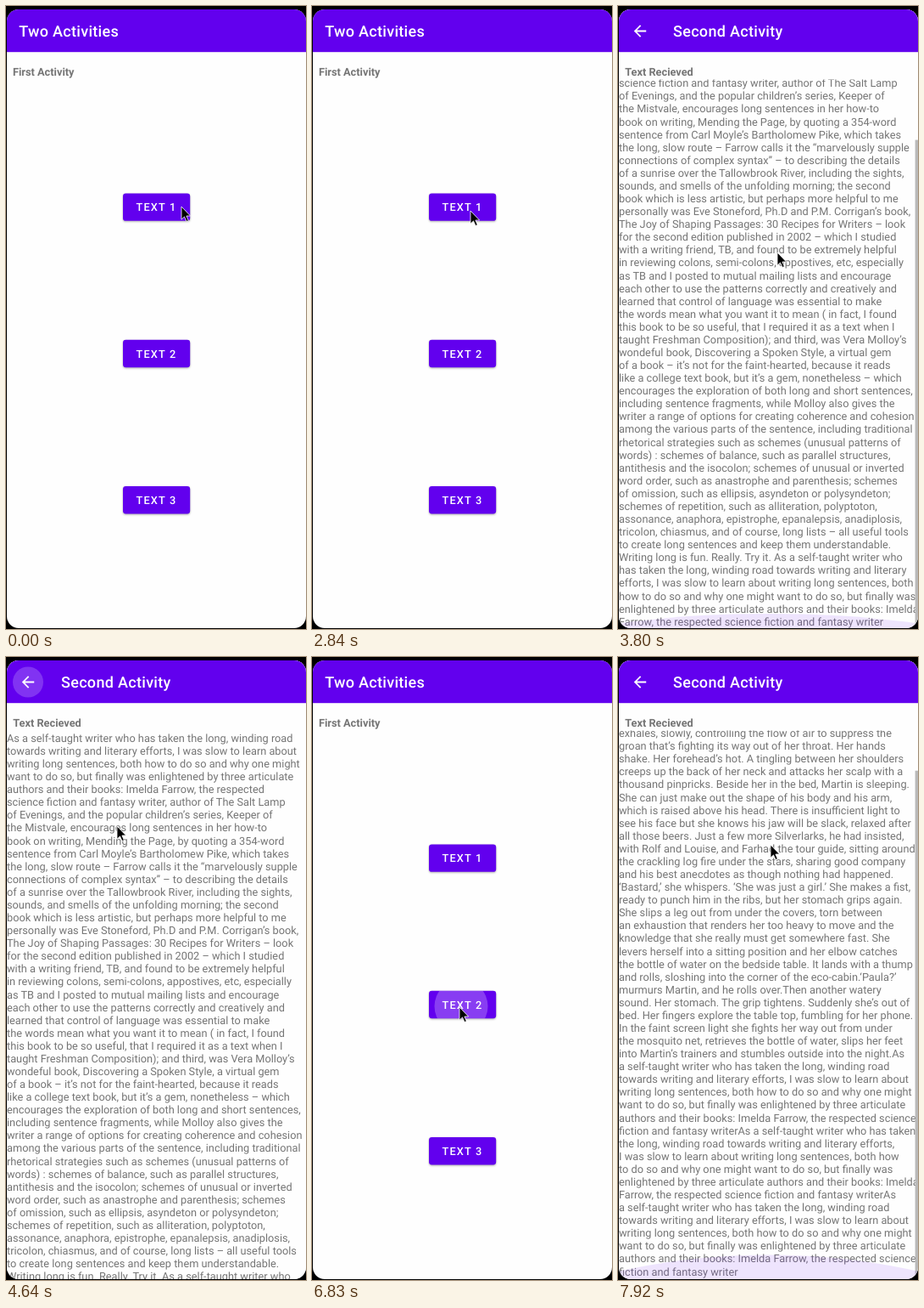
An HTML page that plays this animation: 354 by 733 pixels, repeating every 8000 ms.

```html
<!DOCTYPE html>
<html lang="en">
<head>
<meta charset="utf-8">
<title>Two Activities</title>
<style>
html, body { margin: 0; width: 100%; height: 100%; overflow: hidden; background: #000; }
svg { display: block; }
text { font: 12.785px Roboto, sans-serif; fill: #757575; text-rendering: geometricPrecision; white-space: pre; }
text.title { font-size: 18.03px; font-weight: 500; fill: #fff; letter-spacing: .016em; }
text.label { font-weight: 700; }
text.caption { font-weight: 500; fill: #fff; letter-spacing: .0893em; }
.page { fill: #fefefe; }
.purple { fill: #6200ee; }
.button { filter: drop-shadow(0 1.2px 1.1px rgba(0, 0, 0, .32)); }
</style>
</head>
<body>
<svg width="354" height="733" viewBox="0 0 354 733">
  <defs>
    <clipPath id="screen"><rect x="1" y="4" width="353" height="728" rx="14"/></clipPath>
    <clipPath id="view"><rect x="0" y="86.4" width="354" height="645.6"/></clipPath>
    <clipPath id="buttonClip"></clipPath>
  </defs>
  <g clip-path="url(#screen)">
    <g id="first">
      <rect class="page" x="1" y="4" width="353" height="728"/>
      <rect class="purple" x="1" y="4" width="353" height="50.2"/>
      <text class="title" x="15.2" y="36.3">Two Activities</text>
      <text class="label" x="7.9" y="82.3">First Activity</text>
      <g id="buttons"></g>
      <g clip-path="url(#buttonClip)"><circle id="ripple" fill="#fff"/></g>
      <g id="captions"></g>
    </g>
    <g id="second">
      <rect class="page" x="1" y="4" width="353" height="728"/>
      <rect class="purple" x="1" y="4" width="353" height="50.2"/>
      <circle id="backRipple" cx="26" cy="29.5" r="18" fill="#fff"/>
      <path fill="#fff" transform="translate(15.2 18.7) scale(.9014)"
        d="M20 11H7.83l5.59-5.59L12 4l-8 8 8 8 1.41-1.41L7.83 13H20z"/>
      <text class="title" x="65" y="36.3">Second Activity</text>
      <text class="label" x="8.2" y="82.3">Text Recieved</text>
      <g clip-path="url(#view)">
        <g id="story0"></g>
        <g id="story1"></g>
        <rect id="thumb" x="350.6" width="3.4" fill="#b9b9b9"/>
        <ellipse id="glow" class="purple" cx="177.5" rx="425" fill-opacity=".1"/>
      </g>
    </g>
  </g>
  <path id="cursor" d="M0 0V15.2L3.5 11.9 6 17.5 8.3 16.5 5.9 11H10.6Z" stroke="#fff" stroke-width=".8"/>
</svg>
<script>
const stories = [`As a self-taught writer who has taken the long, winding road
towards writing and literary efforts, I was slow to learn about
writing long sentences, both how to do so and why one might
want to do so, but finally was enlightened by three articulate
authors and their books: Imelda Farrow, the respected
science fiction and fantasy writer, author of The Salt Lamp
of Evenings, and the popular children’s series, Keeper of
the Mistvale, encourages long sentences in her how-to
book on writing, Mending the Page, by quoting a 354-word
sentence from Carl Moyle’s Bartholomew Pike, which takes
the long, slow route – Farrow calls it the “marvelously supple
connections of complex syntax” – to describing the details
of a sunrise over the Tallowbrook River, including the sights,
sounds, and smells of the unfolding morning; the second
book which is less artistic, but perhaps more helpful to me
personally was Eve Stoneford, Ph.D and P.M. Corrigan’s book,
The Joy of Shaping Passages: 30 Recipes for Writers – look
for the second edition published in 2002 – which I studied
with a writing friend, TB, and found to be extremely helpful
in reviewing colons, semi-colons, appostives, etc, especially
as TB and I posted to mutual mailing lists and encourage
each other to use the patterns correctly and creatively and
learned that control of language was essential to make
the words mean what you want it to mean ( in fact, I found
this book to be so useful, that I required it as a text when I
taught Freshman Composition); and third, was Vera Molloy’s
wondeful book, Discovering a Spoken Style, a virtual gem
of a book – it’s not for the faint-hearted, because it reads
like a college text book, but it’s a gem, nonetheless – which
encourages the exploration of both long and short sentences,
including sentence fragments, while Molloy also gives the
writer a range of options for creating coherence and cohesion
among the various parts of the sentence, including traditional
rhetorical strategies such as schemes (unusual patterns of
words) : schemes of balance, such as parallel structures,
antithesis and the isocolon; schemes of unusual or inverted
word order, such as anastrophe and parenthesis; schemes
of omission, such as ellipsis, asyndeton or polysyndeton;
schemes of repetition, such as alliteration, polyptoton,
assonance, anaphora, epistrophe, epanalepsis, anadiplosis,
tricolon, chiasmus, and of course, long lists – all useful tools
to create long sentences and keep them understandable.
Writing long is fun. Really. Try it. As a self-taught writer who
has taken the long, winding road towards writing and literary
efforts, I was slow to learn about writing long sentences, both
how to do so and why one might want to do so, but finally was
enlightened by three articulate authors and their books: Imelda
Farrow, the respected science fiction and fantasy writer`,
`Sweat lies cold on Paula’s skin. She shivers. Her stomach
tightens and she tucks up her knees as pain slices through
her gut. She grits her teeth and holds her breath. Then she
exhales, slowly, controlling the flow of air to suppress the
groan that’s fighting its way out of her throat. Her hands
shake. Her forehead’s hot. A tingling between her shoulders
creeps up the back of her neck and attacks her scalp with a
thousand pinpricks. Beside her in the bed, Martin is sleeping.
She can just make out the shape of his body and his arm,
which is raised above his head. There is insufficient light to
see his face but she knows his jaw will be slack, relaxed after
all those beers. Just a few more Silverlarks, he had insisted,
with Rolf and Louise, and Farhad the tour guide, sitting around
the crackling log fire under the stars, sharing good company
and his best anecdotes as though nothing had happened.
‘Bastard,’ she whispers. ‘She was just a girl.’ She makes a fist,
ready to punch him in the ribs, but her stomach grips again.
She slips a leg out from under the covers, torn between
an exhaustion that renders her too heavy to move and the
knowledge that she really must get somewhere fast. She
levers herself into a sitting position and her elbow catches
the bottle of water on the bedside table. It lands with a thump
and rolls, sloshing into the corner of the eco-cabin.‘Paula?’
murmurs Martin, and he rolls over.Then another watery
sound. Her stomach. The grip tightens. Suddenly she’s out of
bed. Her fingers explore the table top, fumbling for her phone.
In the faint screen light she fights her way out from under
the mosquito net, retrieves the bottle of water, slips her feet
into Martin’s trainers and stumbles outside into the night.As
a self-taught writer who has taken the long, winding road
towards writing and literary efforts, I was slow to learn about
writing long sentences, both how to do so and why one might
want to do so, but finally was enlightened by three articulate
authors and their books: Imelda Farrow, the respected science
fiction and fantasy writerAs a self-taught writer who has taken
the long, winding road towards writing and literary efforts,
I was slow to learn about writing long sentences, both how
to do so and why one might want to do so, but finally was
enlightened by three articulate authors and their books: Imelda
Farrow, the respected science fiction and fantasy writerAs
a self-taught writer who has taken the long, winding road
towards writing and literary efforts, I was slow to learn about
writing long sentences, both how to do so and why one might
want to do so, but finally was enlightened by three articulate
authors and their books: Imelda Farrow, the respected science
fiction and fantasy writer`].map(s => s.split("\n"));

const LOOP = 8000, LINE = 15.08, VIEW_TOP = 86.4, VIEW_HEIGHT = 645.6;
const OPEN_TIMES = [2975, 6968], CLOSE_TIME = 5040, SECOND_TAP = 6500;
const $ = id => document.getElementById(id);
const set = (id, attrs) => {
  for (const key in attrs) $(id).setAttribute(key, attrs[key]);
};

stories.forEach((lines, i) => {
  $("story" + i).innerHTML =
    lines.map((s, n) => `<text x="1" y="${99.9 + n * LINE}">${s}</text>`).join("");
});
[220.4, 392.8, 565.1].forEach((y, i) => {
  const box = `<rect class="purple button" x="138" y="${y}" width="79.2" height="32.4" rx="3.4"/>`;
  $("buttons").innerHTML += box;
  $("buttonClip").innerHTML += box.replace(" button", "");
  $("captions").innerHTML += `<text class="caption" x="153.6" y="${y + 20.8}">TEXT ${i + 1}</text>`;
});

const range = (from, to) => Array.from({ length: (to - from) / 120 + 1 }, (_, i) => from + i * 120);
const ticks = [0, ...range(240, 480), 850, 2350, 2470, ...range(2840, 5960),
  ...range(6710, 7310), ...range(7680, 7920)];

const clamp = v => Math.min(1, Math.max(0, v));
const mix = (a, b, p) => a + (b - a) * p;

// Keys are [time, value, value...], joined by straight lines.
function track(keys, t) {
  const n = keys.findIndex(k => k[0] > t);
  if (n === 0) return keys[0].slice(1);
  if (n < 0) return keys[keys.length - 1].slice(1);
  const a = keys[n - 1], b = keys[n], p = (t - a[0]) / (b[0] - a[0]);
  return a.slice(1).map((v, i) => mix(v, b[i + 1], p));
}

const cursorKeys = [[120, 207, 236], [480, 187, 241], [2960, 187, 241], [3320, 194, 327],
  [3560, 196, 390], [3800, 188, 290], [4040, 186, 390], [4400, 27, 29], [4520, 27, 31],
  [4640, 131, 199], [5000, 148, 345], [5360, 161, 428], [5600, 165, 439], [5960, 174, 412],
  [7560, 174, 412], [7920, 180, 221]];
const scrollKeys = [[3560, 0], [3780, 80], [3820, 80], [4040, 0], [7560, 0], [7740, 51]];
const glowKeys = [[3760, 0], [3800, .3], [3920, 0], [7740, 0], [7920, .5]];
// start, end, x, y, radius, opacity
const ripples = [[850, 2350, 185, 238, 28, .24], [2350, 2470, 183.5, 240, 31.5, .24],
  [2470, 2840, 183.5, 240, 31.5, .12], [6710, 6830, 176, 411, 28, .24],
  [6830, 6950, 176, 411, 31.5, .24]];

const bezier = (p, u) => {
  const v = 1 - u;
  return v * v * v * p[0] + 3 * v * v * u * p[1] + 3 * v * u * u * p[2] + u * u * u * p[3];
};
// Fast out, extra slow in
function ease(p) {
  p = clamp(p);
  const [xs, ys] = p < 1 / 6
    ? [[0, .05, .13333, 1 / 6], [0, 0, .06, .4]]
    : [[1 / 6, .20833, .25, 1], [.4, .82, 1, 1]];
  let low = 0, high = 1;
  for (let i = 0; i < 24; i++) {
    const mid = (low + high) / 2;
    if (bezier(xs, mid) < p) low = mid; else high = mid;
  }
  return bezier(ys, low);
}

function pose(id, scale, opacity) {
  set(id, {
    transform: `translate(177.5 368) scale(${scale}) translate(-177.5 -368)`,
    opacity
  });
}

function drawPages(t) {
  if (t >= CLOSE_TIME && t < SECOND_TAP) {
    const age = t - CLOSE_TIME, p = ease(age / 400);
    pose("first", mix(1.1, 1, p), 1);
    pose("second", mix(1, .9, p), 1 - clamp((age - 66) / 50));
  } else {
    const age = t - OPEN_TIMES[t < SECOND_TAP ? 0 : 1], p = ease(age / 400);
    pose("first", mix(1, 1.15, p), 1);
    pose("second", mix(.85, 1, p), clamp((age - 35) / 50));
  }
}

function drawStory(t) {
  const current = t < SECOND_TAP ? 0 : 1;
  const [scroll] = track(scrollKeys, t), [glow] = track(glowKeys, t);
  const content = stories[current].length * LINE + 2;
  stories.forEach((_, i) => set("story" + i, {
    transform: `translate(0 ${-scroll})`,
    display: i === current ? "inline" : "none"
  }));
  set("thumb", {
    y: VIEW_TOP + scroll * VIEW_HEIGHT / content,
    height: VIEW_HEIGHT * VIEW_HEIGHT / content,
    opacity: current ? 1 : 1 - clamp((t - 4300) / 250)
  });
  set("glow", { cy: 732 + 368 * glow, ry: 425 * glow });
}

function draw(now) {
  const time = now % LOOP;
  const t = ticks.filter(v => v <= time).pop();
  drawPages(t);
  drawStory(t);
  const [, , cx, cy, r, opacity] = ripples.find(k => t >= k[0] && t < k[1]) || [0, 0, 0, 0, 0, 0];
  set("ripple", { cx, cy, r, opacity });
  set("backRipple", { opacity: t >= 4520 && t < SECOND_TAP ? .2 : 0 });
  set("cursor", { transform: `translate(${track(cursorKeys, t)})` });
}

const start = performance.now();
function frame() {
  draw(performance.now() - start);
  requestAnimationFrame(frame);
}
frame();
</script>
</body>
</html>
```
